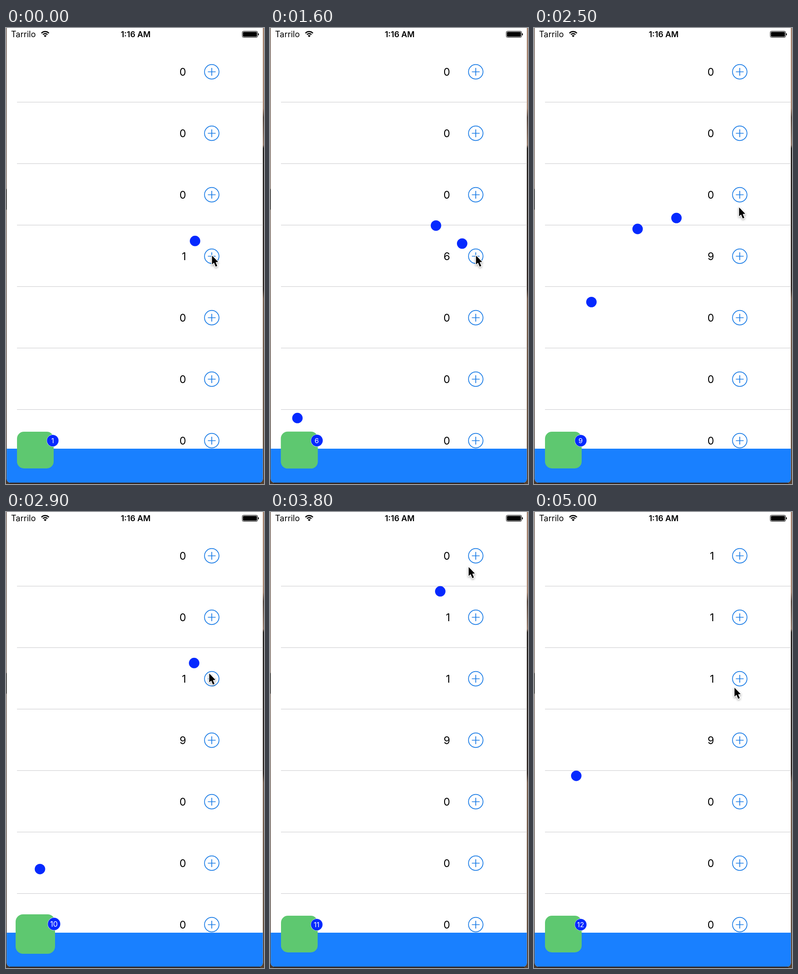
An HTML page with a canvas for the animation above (5100 ms loop, 563x994 px).

```html
<!DOCTYPE html>
<html lang="en">
<head>
<meta charset="utf-8">
<title>Add to cart</title>
<style>
html, body { margin: 0; width: 100%; height: 100%; overflow: hidden; background: #fff; }
canvas { display: block; }
</style>
</head>
<body>
<canvas id="stage" width="563" height="994"></canvas>
<script>
const ctx = document.getElementById('stage').getContext('2d');
const LOOP = 5100, STEP = 100, FLIGHT = 820, PULSE = 220;
const ROWS = 7, ROW_HEIGHT = 134, BUTTON_X = 449;
const FONT = 'Inter, "Liberation Sans", sans-serif';
const TINT = '#1a7ce6', DOT = '#0529ff';

// [time, row] of each press; the first happens just before the loop starts
const taps = [
  [-167, 3], [488, 3], [571, 3], [805, 3], [1325, 3], [1451, 3],
  [1829, 3], [1996, 3], [2134, 3], [2728, 2], [3543, 1], [4269, 0]
];

// [time, x, y] of the pointer tip
const pointerPath = [
  [0, 449, 496], [2200, 449, 496], [2500, 447, 391], [2700, 443, 352],
  [2950, 443, 352], [3350, 443, 221], [3600, 443, 221], [3800, 433, 120],
  [4050, 441, 89], [4350, 441, 89], [5000, 437, 383]
];

const rowY = row => 95.5 + row * ROW_HEIGHT;
const mix = (a, b, u) => a + (b - a) * u;
const smooth = u => u * u * (3 - 2 * u);

// cubic-bezier(0.42, 0, 1, 1)
function easeIn(x) {
  let low = 0, high = 1;
  for (let i = 0; i < 24; i++) {
    const s = (low + high) / 2, r = 1 - s;
    if (1.26 * r * r * s + 3 * r * s * s + s ** 3 < x) low = s; else high = s;
  }
  return 3 * (1 - low) * low * low + low ** 3;
}

function circle(x, y, r, color) {
  ctx.fillStyle = color;
  ctx.beginPath();
  ctx.arc(x, y, r, 0, Math.PI * 2);
  ctx.fill();
}

function box(x, y, w, h, r, color) {
  ctx.fillStyle = color;
  ctx.beginPath();
  ctx.roundRect(x, y, w, h, r);
  ctx.fill();
}

function text(str, x, y, size, align, color = '#000', weight = 400) {
  ctx.font = `${weight} ${size}px ${FONT}`;
  ctx.textAlign = align;
  ctx.fillStyle = color;
  ctx.fillText(str, x, y);
}

function strip(x, w, stops) {
  const g = ctx.createLinearGradient(0, 0, 0, 994);
  stops.forEach(([at, color]) => g.addColorStop(at / 994, color));
  ctx.fillStyle = g;
  ctx.fillRect(x, 0, w, 994);
}

function drawScreen() {
  strip(0, 20, [[0, '#6d5a50'], [350, '#75645a'], [352, '#15110f'], [395, '#15110f'],
    [397, '#75645a'], [994, '#42362f']]);
  strip(540, 23, [[0, '#a17c66'], [175, '#a17c66'], [195, '#4a3a31'], [255, '#8b6e5c'],
    [262, '#17120f'], [570, '#241a15'], [590, '#6e5442'], [994, '#55402f']]);
  ctx.fillStyle = '#342b28';
  ctx.fillRect(8, 985, 547, 9);
  box(1.5, -10, 559, 1001, 8, '#fff');
  box(1.5, 917, 559, 74, [0, 0, 8, 8], '#1980ff');
}

function drawStatusBar() {
  text('Tarrilo', 11, 20, 18, 'left');
  text('1:16 AM', 283, 20, 17.6, 'center', '#000', 600);

  ctx.strokeStyle = '#000';
  ctx.lineWidth = 2.4;
  for (const r of [6.8, 11.2]) {
    ctx.beginPath();
    ctx.arc(85.5, 19, r, -Math.PI * 0.76, -Math.PI * 0.24);
    ctx.stroke();
  }
  ctx.fillStyle = '#000';
  ctx.beginPath();
  ctx.moveTo(85.5, 20);
  ctx.arc(85.5, 19.6, 4.2, -Math.PI * 0.76, -Math.PI * 0.24);
  ctx.fill();

  ctx.lineWidth = 1;
  ctx.beginPath();
  ctx.roundRect(515.5, 7, 33.5, 13.5, 3);
  ctx.stroke();
  box(517, 8.5, 30.5, 10.5, 1.8, '#000');
  box(550, 11.2, 1.8, 5, [0, 2, 2, 0], '#000');
}

function drawRow(row, count, pressed) {
  const y = rowY(row);
  text(count, 393, y + 8.5, 23, 'right');

  ctx.globalAlpha = pressed ? 0.72 : 1;
  ctx.strokeStyle = TINT;
  ctx.lineWidth = 1.7;
  ctx.beginPath();
  ctx.arc(BUTTON_X, y, 15.8, 0, Math.PI * 2);
  ctx.moveTo(BUTTON_X - 8.5, y);
  ctx.lineTo(BUTTON_X + 8.5, y);
  ctx.moveTo(BUTTON_X, y - 8.5);
  ctx.lineTo(BUTTON_X, y + 8.5);
  ctx.stroke();
  ctx.globalAlpha = 1;

  if (row < ROWS - 1) {
    ctx.fillStyle = '#d2d2d4';
    ctx.fillRect(24, y + 65.5, 536.5, 1.2);
  }
}

function pulseScale(time) {
  let scale = 1;
  for (const [start] of taps) {
    const u = (time - start - FLIGHT) / PULSE;
    if (u > 0 && u < 1) {
      scale = 1 + 0.165 * Math.sin(Math.PI * u ** 1.5) ** 2;
    }
  }
  return scale;
}

function drawCart(total, scale) {
  ctx.save();
  ctx.translate(64, 920);
  ctx.scale(scale, scale);
  box(-40, -40, 80, 80, 15, '#5ec870');
  circle(38, -20.5, 13.2, '#dfe8ff');
  circle(38, -20.5, 12.6, DOT);
  text(total, 37.7, -15.2, 15, 'center', '#fff');
  ctx.restore();
}

function drawDot(age, row) {
  if (age < 0 || age >= FLIGHT) return;
  const u = easeIn(age / FLIGHT), v = 1 - u, y = rowY(row);
  const curve = (a, b, c) => v * v * a + 2 * v * u * b + u * u * c;
  circle(curve(BUTTON_X, 160, 48), curve(y, y - 291, 920), 11.4, DOT);
}

function drawPointer(time) {
  const next = pointerPath.findIndex(p => p[0] >= time);
  const b = pointerPath[next], a = pointerPath[Math.max(next - 1, 0)];
  const u = a === b ? 0 : smooth((time - a[0]) / (b[0] - a[0]));

  ctx.save();
  ctx.translate(mix(a[1], b[1], u), mix(a[2], b[2], u));
  ctx.beginPath();
  [[0.5, 0], [0.5, 19.5], [4.8, 15.6], [8.6, 24.2], [12, 22.6], [8.4, 14.4], [14, 14]]
    .forEach(([x, y]) => ctx.lineTo(x, y));
  ctx.closePath();
  ctx.shadowColor = 'rgba(0,0,0,0.35)';
  ctx.shadowBlur = 4;
  ctx.shadowOffsetY = 2;
  ctx.lineJoin = 'round';
  ctx.lineWidth = 3;
  ctx.strokeStyle = '#fff';
  ctx.stroke();
  ctx.shadowColor = 'transparent';
  ctx.fillStyle = '#000';
  ctx.fill();
  ctx.restore();
}

function render(time) {
  const done = taps.filter(([start]) => start <= time);
  drawScreen();
  drawStatusBar();
  for (let row = 0; row < ROWS; row++) {
    const count = done.filter(tap => tap[1] === row).length;
    const pressed = taps.some(([start, r]) => r === row && time < start && time >= start - 80);
    drawRow(row, count, pressed);
  }
  drawCart(done.length, pulseScale(time));
  done.forEach(([start, row]) => drawDot(time - start, row));
  drawPointer(time);
}

const begin = performance.now();
function tick() {
  const time = (performance.now() - begin) % LOOP;
  render(Math.floor(time / STEP) * STEP);
  requestAnimationFrame(tick);
}
tick();
</script>
</body>
</html>
```
